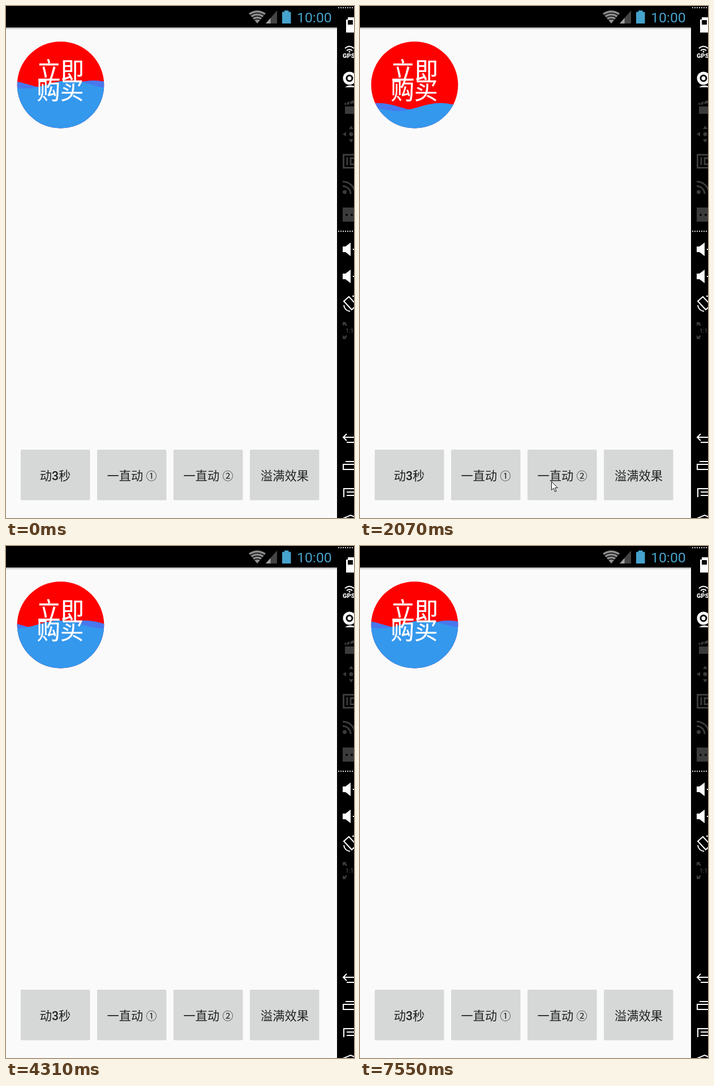
Animation, 615 px wide and 907 px high, one loop 7.62 s. Source, as an HTML page:

```html
<!DOCTYPE html>
<html lang="zh-CN">
<head>
<meta charset="utf-8">
<title>Wave button</title>
<style>
html, body { margin: 0; width: 100%; height: 100%; overflow: hidden; background: #fafafa; }
svg { display: block; width: 615px; height: 907px; }
text { font-family: Roboto, "Noto Sans CJK SC", "Noto Sans CJK", sans-serif; }
.label { font-size: 41.5px; fill: #fff; stroke: #fff; stroke-width: .4; text-anchor: middle; font-family: "Noto Sans CJK SC", "Noto Sans CJK", sans-serif; }
.btn rect { fill: #d6d7d7; }
.btn text { font-size: 21.2px; font-weight: 500; fill: #212121; text-anchor: middle; }
.btn tspan { font-size: 19px; font-weight: 300; }
.line { fill: none; stroke: #fff; stroke-width: 2; }
.dim { fill: #3b3b3b; }
.dimline { fill: none; stroke: #3b3b3b; stroke-width: 3; }
#press { fill: #000; opacity: 0; animation: press 7620ms linear infinite; }
#cursor { transform: translate(436px, 912px); animation: move 7620ms ease-in-out infinite; }
@keyframes press {
  0%, 14.8% { opacity: 0; }
  16%, 17% { opacity: .13; }
  20.5%, 100% { opacity: 0; }
}
@keyframes move {
  0%, 5% { transform: translate(432px, 910px); }
  10.6%, 50.6% { transform: translate(338px, 842px); }
  51.4% { transform: translate(352px, 850px); animation-timing-function: linear; }
  55.4%, 100% { transform: translate(440px, 912px); }
}
</style>
</head>
<body>
<svg viewBox="0 0 615 907">
  <defs>
    <clipPath id="disc"><circle cx="96.5" cy="139.8" r="76.8"/></clipPath>
    <linearGradient id="shade" x2="0" y2="1">
      <stop offset="0" stop-color="#000" stop-opacity=".3"/>
      <stop offset="1" stop-color="#000" stop-opacity="0"/>
    </linearGradient>
    <g id="speaker"><path d="M595 7h5l9-7v24l-9-7h-5z" fill="#fff"/><path class="line" d="M613 12h6"/></g>
  </defs>

  <rect width="615" height="907" fill="#fafafa"/>
  <rect y="38" width="585" height="4" fill="url(#shade)"/>
  <rect width="585" height="38"/>

  <!-- status bar -->
  <path d="M444 31L429 13Q444 3 459 13Z" fill="#8c8c8c"/>
  <path d="M431 17q13-9 26 0M434.5 21q9.500-6.500 19 0M438 25q6-4 12 0" fill="none" stroke="#000" stroke-width="1.5"/>
  <path d="M459 31h20V8z" fill="#444"/>
  <path d="M459 31h8.500v-9.800z" fill="#a0a0a0"/>
  <path d="M488 10.500h4V8h7.500v2.500h4V31H488z" fill="#46a3cd"/>
  <text x="514" y="28.500" font-size="24.800" fill="#46a3cd">10:00</text>

  <!-- wave disc -->
  <g clip-path="url(#disc)">
    <rect x="19" y="62" width="156" height="156" fill="#f00"/>
    <path id="back" fill="#4877ee"/>
    <path id="front" fill="#3498ed"/>
  </g>
  <text class="label" x="96.500" y="129.500">立即</text>
  <text class="label" x="96" y="165">购买</text>

  <!-- buttons -->
  <g class="btn">
    <rect x="26" y="786" width="122.500" height="89.500" rx="2"/><text x="87" y="839.500">动3秒</text>
    <rect x="161" y="786" width="122.500" height="89.500" rx="2"/><text x="222.500" y="839.500">一直动 <tspan>①</tspan></text>
    <rect x="296" y="786" width="122.500" height="89.500" rx="2"/><text x="357.500" y="839.500">一直动 <tspan>②</tspan></text>
    <rect x="431" y="786" width="122.500" height="89.500" rx="2"/><text x="492.500" y="839.500">溢满效果</text>
  </g>
  <rect id="press" x="296" y="786" width="122.500" height="89.500" rx="2"/>

  <!-- side toolbar -->
  <rect x="585" width="30" height="907"/>
  <path d="M587 3h28M587 399h28" stroke="#ddd" stroke-width="2" stroke-dasharray="2 2"/>
  <path d="M601 24h3v-4h11v27h-14z" fill="#fff"/><path d="M604 25h9v8h-9z"/>
  <path class="line" d="M599 75q8-7 16 0M602 79q5-4 10 0"/>
  <circle cx="607" cy="81" r="1.500" fill="#fff"/>
  <text x="595" y="92" font-size="11" font-weight="900" fill="#fff">GPS</text>
  <circle cx="607" cy="128" r="11.500" fill="#fff"/><circle cx="607" cy="128" r="6.500"/><circle cx="607" cy="128" r="3.500" fill="#fff"/>
  <path d="M599 144q8-6 16-2v2z" fill="#fff"/>
  <g class="dim">
    <path d="M599 178h16v13h-16zM598 172l17-5v5l-16 4z"/>
    <path d="M595 227l6-4v8zM606 218l4-6 4 6zM606 236h8l-4 6z"/><circle cx="610" cy="227" r="3.500"/>
    <circle cx="598.500" cy="329.500" r="3.500"/>
    <path d="M595 357h20v25h-20z"/>
    <path d="M595 560h7l-2 2 3 3-2 2-3-3-3 3zM595 590h7l-2-2 3-3-2-2-3 3-3-3z"/>
    <text x="600" y="579" font-size="10" font-weight="700">1:1</text>
  </g>
  <path d="M603 168l-2 8m8-9l-2 8" stroke="#000" stroke-width="1.500"/>
  <path class="dimline" d="M620 263.500H596.500v23H620M603 268v14M609 269.500h3q6 0 6 5.500t-6 5.500h-3z"/>
  <path class="dimline" d="M595 319a14 14 0 0 1 14 14M595 311a22 22 0 0 1 22 22"/>
  <circle cx="602" cy="370" r="2"/><circle cx="611" cy="370" r="2"/>
  <use href="#speaker" y="419"/>
  <use href="#speaker" y="467"/>
  <path class="line" d="M597 523l9-8 14 15-9 8zM597 530q1 9 11 11M612 514h6"/>
  <path class="line" d="M602 758l-6 6 6 6M596 764h20M602 773h14"/>
  <path class="line" d="M620 812H596v9h24M600 807h20"/>
  <path class="line" d="M597 870V855h23M602 861h13M602 867h13"/>
  <path class="line" d="M595 908l14-6 14 6"/>

  <path id="cursor" d="M.5.5v15l3.500-3.200 2.600 6 2.400-1-2.600-5.800h4.800z" fill="#fff" stroke="#111"/>
</svg>
<script>
const LOOP = 7620, CLICK = 1218, RISE = 3000;
const WIDTH = 154, AMP = 7, GAP = 44, REST = 139, EMPTY = 217;
const back = document.getElementById('back');
const front = document.getElementById('front');

// midpoint between the two crests over time, before and after the click
const idle = [[0, 133], [1050, 174], [CLICK, 181]];
const running = [[CLICK, 120], [2070, 164], [2990, 212], [4310, 271], [5770, 336], [7550, 442], [LOOP, 445]];

function track(keys, t) {
  let i = 1;
  while (i < keys.length - 1 && t > keys[i][0]) i++;
  const [t0, a] = keys[i - 1], [t1, b] = keys[i];
  return a + (b - a) * (t - t0) / (t1 - t0);
}

function waterLevel(t) {
  if (t < CLICK) return REST;
  const left = 1 - Math.min(1, (t - CLICK) / RISE);
  return REST + (EMPTY - REST) * left * left;
}

function wave(crest, level) {
  let d = 'M18 220';
  for (let x = 18; x <= 176; x += 2) {
    const y = level - AMP * Math.cos((x - crest) / WIDTH * 2 * Math.PI);
    d += `L${x} ${y.toFixed(2)}`;
  }
  return d + 'L176 220Z';
}

let start;
function draw(now) {
  if (start === undefined) start = now;
  const t = (now - start) % LOOP;
  const mid = track(t < CLICK ? idle : running, t);
  const level = waterLevel(t);
  back.setAttribute('d', wave(mid + GAP / 2, level));
  front.setAttribute('d', wave(mid - GAP / 2, level));
  requestAnimationFrame(draw);
}
requestAnimationFrame(draw);
</script>
</body>
</html>
```
